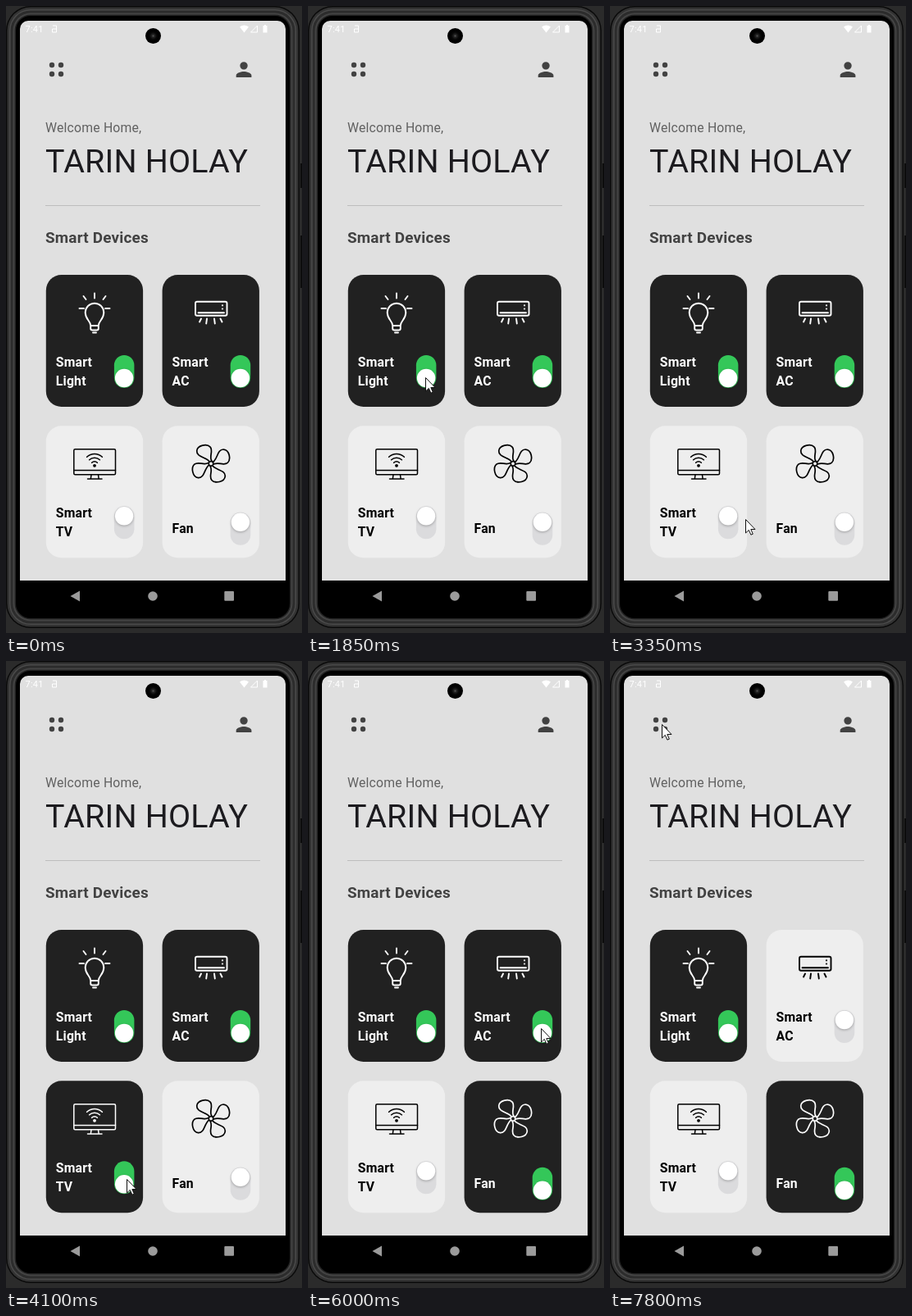
These frames come from a looping animation (361x765 px, 8000 ms). An HTML page:

```html
<!DOCTYPE html>
<html lang="en">
<head>
<meta charset="utf-8">
<title>Smart home</title>
<style>
  html, body { margin: 0; width: 100%; height: 100%; overflow: hidden; background: #2b2b2b; }
  svg { display: block; width: 361px; height: 765px; font-family: Roboto, sans-serif; letter-spacing: .2px; }
  .label { font-size: 15.77px; font-weight: 700; fill: currentColor; }
  .icon { fill: none; stroke: currentColor; stroke-width: 1.9; stroke-linecap: round; stroke-linejoin: round; }
  .dot { fill: currentColor; stroke: none; }
  .knob { fill: #fff; filter: drop-shadow(0 1px 1.5px rgba(0, 0, 0, .28)); }
</style>
</head>
<body>
<svg viewBox="0 0 361 765">
  <defs>
    <radialGradient id="lens">
      <stop stop-color="#555"/><stop offset=".3" stop-color="#222"/><stop offset=".75" stop-color="#050505"/>
    </radialGradient>
    <g id="bulb">
      <path d="M108 350.5v6M94.500 354l3 4M121.500 354l-3 4M89.500 369h5.500M121 369h5.500"/>
      <path d="M103.200 390c0-6-6.500-7.500-6.500-16a11.300 11.300 0 0 1 22.600 0c0 8.500-6.500 10-6.500 16zM103.200 390v3.500q0 2 2 2h5.600q2 0 2-2v-3.500M106 398.500h4"/>
    </g>
    <g id="ac">
      <rect x="231" y="360.800" width="38.500" height="17" rx="2"/>
      <path d="M234.500 374.300h31.500M238 381.500l-2 4M245 381.500l-.8 6M254 381.500l.8 6M261.500 381.500l2 4"/>
      <circle class="dot" cx="264" cy="365.300" r="1.100"/><circle class="dot" cx="264" cy="369.500" r="1.100"/>
    </g>
    <g id="tv" stroke-width="1.500">
      <rect x="82.800" y="540.800" width="50.700" height="31" rx="1.500"/>
      <path d="M83 566.500h50.500M104 572l-.6 4.500M112.500 572l.6 4.500M99.500 577h17.500"/>
      <path d="M104.600 557.200a4.800 4.800 0 0 1 6.800 0M101.600 553.800a9 9 0 0 1 12.800 0M98.600 550.300a13.500 13.500 0 0 1 18.800 0"/>
      <circle class="dot" cx="108" cy="560.800" r="1.900"/>
    </g>
    <path id="blade" d="M-1.500-3C-4-9-16-11-14-18.500C-12-25.500 0-25 3-20C6-14.500-1-9 1.500-3"/>
    <g id="fan" transform="translate(250 558.300) rotate(-11)" stroke-width="1.700">
      <circle r="2.800"/>
      <use href="#blade"/><use href="#blade" transform="rotate(90)"/>
      <use href="#blade" transform="rotate(180)"/><use href="#blade" transform="rotate(270)"/>
    </g>
  </defs>

  <rect width="361" height="765" fill="#2b2b2b"/>
  <path d="M359 192h2v30h-2zM359 280h2v64h-2z" fill="#0c0c0c"/>
  <g id="shell"></g>
  <path d="M17 701V28a10 10 0 0 1 10-10h304a10 10 0 0 1 10 10v673z" fill="#e0e0e0"/>
  <path d="M17 701h324v38H17z"/>
  <g fill="#9b9b9b">
    <path d="M78.500 720l11.500-6.500v13z"/><circle cx="179" cy="720" r="5.800"/>
    <rect x="266.300" y="714" width="11.700" height="11.700" rx="1"/>
  </g>

  <g fill="#fff">
    <text x="23.500" y="32" font-size="11">7:41</text>
    <path d="M285 25.500q5.500-4 11 0l-5.500 7zM313.500 24h1.500v-1h2v1h1.500v8.500h-5z"/>
    <path d="M306.500 24v8h-8zM57 24h4.500v8h-5v-4h5" fill="none" stroke="#fff"/>
  </g>
  <circle cx="179.500" cy="36.500" r="9.500"/><circle cx="179.500" cy="36.500" r="6" fill="url(#lens)"/>

  <g fill="#424242">
    <circle cx="56" cy="72" r="3.200"/><circle cx="67" cy="72" r="3.200"/>
    <circle cx="56" cy="83" r="3.200"/><circle cx="67" cy="83" r="3.200"/>
    <path transform="translate(276 63.500) scale(1.17)" d="M12 12a4 4 0 1 0 0-8 4 4 0 0 0 0 8zm0 2c-2.670 0-8 1.340-8 4v2h16v-2c0-2.660-5.330-4-8-4z"/>
    <text x="48" y="289" font-size="18.900" font-weight="700">Smart Devices</text>
  </g>
  <text x="48" y="154" font-size="15.770" fill="#616161">Welcome Home,</text>
  <text x="48" y="202.500" font-size="39.400" fill="#1c1b1f">TARIN HOLAY</text>
  <path d="M48 243.500h262" stroke="#bdbdbd"/>

  <g id="cards"></g>
  <path id="cursor" d="M.5.5V17l3.800-3.600 2.600 5.800 2.400-1-2.500-5.700h5.200z" fill="#fff" stroke="#111"/>
</svg>

<script>
const LOOP = 8000, STEP = 50;
const OFF = [120, 120, 128, .16], ON = [52, 199, 89, 1];

// inset and colour of the nested layers of the phone body
const shell = [[0, '#0a0a0a'], [1.5, '#333'], [4, '#4a4a4a'], [5.5, '#2c2c2c'],
  [8.5, '#444'], [10.5, '#222'], [12, '#000']];

// taps: times at which the switch is pressed
const devices = [
  { lines: ['Smart', 'Light'], icon: 'bulb', x: 48.8, y: 328, on: true, taps: [1050, 1550] },
  { lines: ['Smart', 'AC'], icon: 'ac', x: 190.6, y: 328, on: true, taps: [2700, 2900, 6050] },
  { lines: ['Smart', 'TV'], icon: 'tv', x: 48.8, y: 512.3, on: false, taps: [3650, 4150] },
  { lines: ['Fan'], icon: 'fan', x: 190.6, y: 512.3, on: false, taps: [4650] }
];

// time, x, y, and whether the way to this point is eased
const path = [
  [100, 332, 724], [700, 143, 453, true], [1850, 143, 453], [2550, 295, 444, true],
  [3100, 295, 444], [3200, 293, 517], [3350, 165, 626], [3450, 147, 632],
  [4250, 147, 632], [4600, 289, 635, true], [5050, 289, 635], [5550, 188, 364, true],
  [5650, 188, 364], [5950, 284, 448, true], [6350, 284, 448], [6500, 276, 402],
  [7200, 54, 81], [7300, 58, 92], [7350, 58, 92], [7700, 63, 77, true]
];

const clamp = v => Math.min(1, Math.max(0, v));
const lerp = (a, b, p) => a + (b - a) * p;
const smooth = p => p * p * (3 - 2 * p);

function buildShell() {
  document.getElementById('shell').innerHTML = shell.map(([d, fill]) =>
    `<rect x="${d}" y="${d}" width="${358 - 2 * d}" height="${759 - 2 * d}" rx="${30 - d}" fill="${fill}"/>`).join('');
}

function buildCard(d) {
  const g = document.createElementNS('http://www.w3.org/2000/svg', 'g');
  const single = d.lines.length === 1;
  const textY = Math.floor(d.y) + (single ? 130.5 : 112);
  d.trackY = d.y + (single ? 105.5 : 98);
  const labels = d.lines.map((s, i) =>
    `<text class="label" x="${d.x + 12}" y="${textY + i * 22.5}">${s}</text>`).join('');
  g.innerHTML = `
    <rect class="back" x="${d.x}" y="${d.y}" width="118.300" height="161" rx="18.900"/>
    <g class="icon"><use href="#${d.icon}"/></g>${labels}
    <rect class="track" x="${d.x + 83.1}" y="${d.trackY}" width="24.500" height="40" rx="12.250"/>
    <circle class="knob" cx="${d.x + 95.3}" r="11.200"/>`;
  document.getElementById('cards').append(g);
  d.group = g;
  [d.back, d.track, d.knob] = ['back', 'track', 'knob'].map(c => g.querySelector('.' + c));
}

function drawCard(d, t) {
  let on = d.on, pos = +on;
  for (const tap of d.taps) {
    if (t < tap) break;
    on = !on;
    pos = lerp(pos, +on, smooth(clamp((t - tap - 80) / 220)));
  }
  const c = OFF.map((v, i) => lerp(v, ON[i], pos));
  d.back.setAttribute('fill', on ? '#212121' : '#eee');
  d.group.setAttribute('color', on ? '#fff' : '#000');
  d.track.setAttribute('fill', `rgba(${c.map(v => v.toFixed(2))})`);
  d.knob.setAttribute('cy', d.trackY + lerp(12, 28, pos));
}

function cursorAt(t) {
  const i = path.findIndex(p => p[0] > t);
  if (i < 0) return path[path.length - 1].slice(1, 3);
  const a = path[i - 1], b = path[i];
  const p = (t - a[0]) / (b[0] - a[0]), e = b[3] ? smooth(p) : p;
  return [lerp(a[1], b[1], e), lerp(a[2], b[2], e)];
}

const cursor = document.getElementById('cursor');
const start = performance.now();

function draw(now) {
  const t = Math.floor(Math.max(0, now - start) % LOOP / STEP) * STEP;
  devices.forEach(d => drawCard(d, t));
  const shown = t >= path[0][0];
  cursor.setAttribute('visibility', shown ? 'visible' : 'hidden');
  if (shown) cursor.setAttribute('transform', `translate(${cursorAt(t)})`);
  requestAnimationFrame(draw);
}

buildShell();
devices.forEach(buildCard);
draw(start);
</script>
</body>
</html>
```
